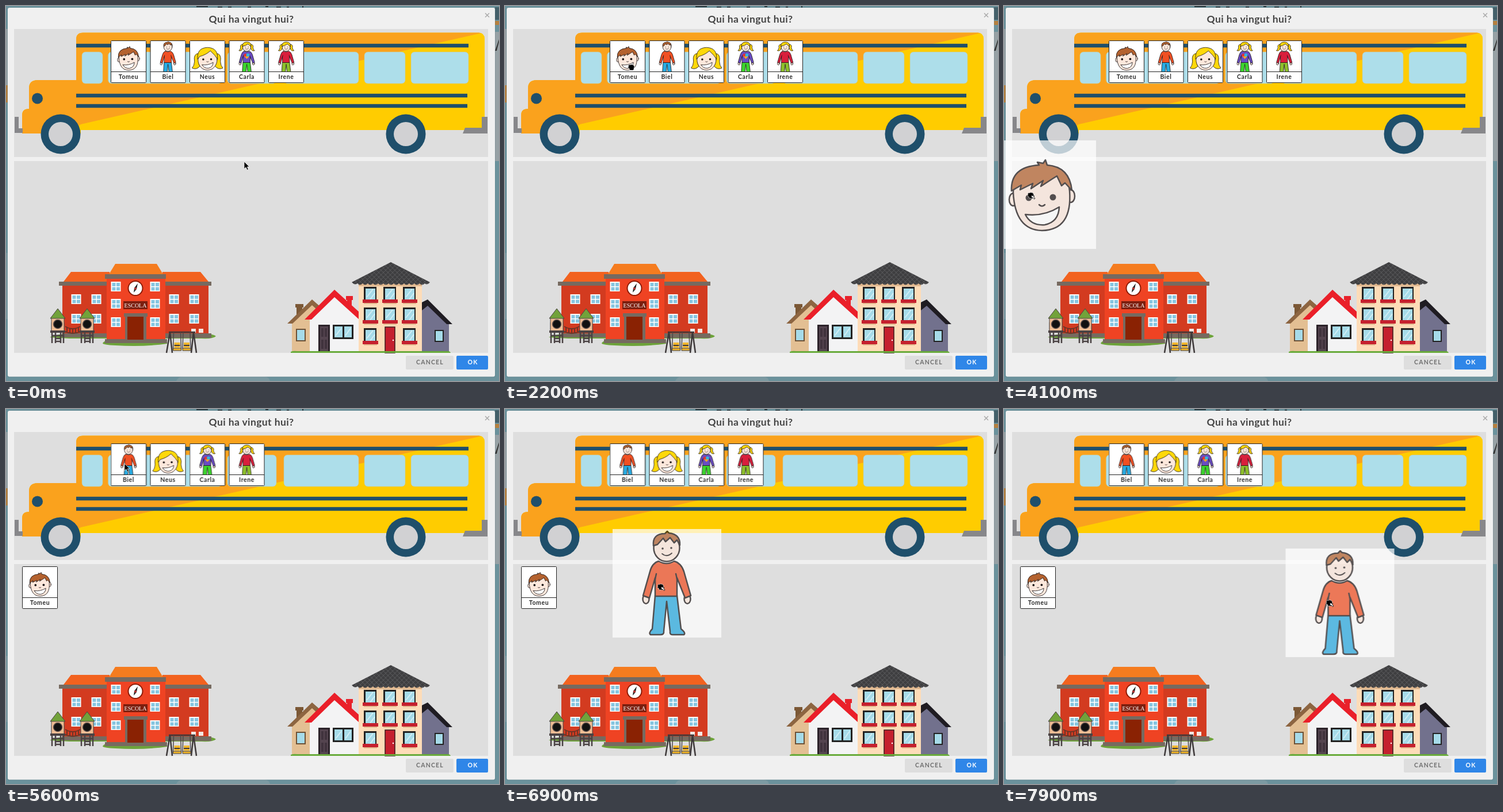
An HTML page that plays this animation: 857x653 px, repeating every 8 s.

```html
<!DOCTYPE html>
<html lang="ca">
<head>
<meta charset="utf-8">
<title>Qui ha vingut hui?</title>
<style>
html, body { margin: 0; width: 100%; height: 100%; overflow: hidden; background: #6b929c; }
svg { display: block; }
text { font-family: Lato, "Open Sans", sans-serif; text-anchor: middle; }
.ink { stroke: #1c1617; stroke-width: 2.5; stroke-linejoin: round; stroke-linecap: round; }
.line { fill: none; }
.skin { fill: #fde8dc; }
.name { font-size: 10.5px; font-weight: 700; letter-spacing: .6px; fill: #2a2a2a; }
.btn { font-size: 10.5px; font-weight: 700; letter-spacing: 1.2px; }

.card, .ghost, .cursor, .arrow, .hand, .badge { animation: 8s step-end infinite; }
.card { animation-name: deal; }
.ghost { transform-origin: 94.5px 94.5px; opacity: 0; }
.first { animation-name: drag-first; }
.second { animation-name: drag-second; }
.cursor { animation-name: move; }
.arrow { animation-name: arrow; }
.hand { animation-name: hand; }
.badge { animation-name: badge; }

@keyframes deal {
  0% { transform: translate(var(--from)); }
  56.25%, 100% { transform: translate(var(--to)); }
}
@keyframes drag-first {
  0% { opacity: 0; transform: translate(148px, 30px) scale(.95); }
  28.75% { opacity: .1; transform: translate(148px, 30px) scale(.95); }
  30% { opacity: .23; transform: translate(152.5px, 60.5px) scale(.96); }
  51.25% { opacity: .72; transform: translate(-29px, 234px); }
  56.25%, 100% { opacity: 0; transform: translate(-29px, 234px); }
}
@keyframes drag-second {
  0% { opacity: 0; }
  73.75% { opacity: .25; transform: translate(148px, 56px) scale(.968); }
  77.5% { opacity: .72; transform: translate(148px, 96px); }
  81.25% { opacity: .72; transform: translate(148px, 136px); }
  86.25% { opacity: .72; transform: translate(187px, 209px); }
  92.5% { opacity: .72; transform: translate(419px, 242px); }
  96.25% { opacity: .72; transform: translate(488px, 243px); }
  98.75%, 100% { opacity: .72; transform: translate(489.5px, 243px); }
}
@keyframes move {
  0% { transform: translate(414px, 271px); }
  5% { transform: translate(414px, 271px); animation-timing-function: steps(4, start); }
  10% { transform: translate(292px, 183px); animation-timing-function: steps(5, start); }
  16.25% { transform: translate(213px, 131px); animation-timing-function: steps(5, start); }
  22.5% { transform: translate(212px, 97px); }
  27.5% { transform: translate(214px, 101px); }
  28.75% { transform: translate(218px, 126px); }
  30% { transform: translate(223px, 157px); }
  51.25% { transform: translate(41px, 324px); }
  56.25% { transform: translate(54px, 328px); }
  61.25% { transform: translate(255px, 205px); }
  63.75% { transform: translate(240px, 133px); }
  67.5% { transform: translate(208px, 97px); }
  70% { transform: translate(206px, 95px); }
  73.75% { transform: translate(223px, 152px); }
  77.5% { transform: translate(223px, 190px); }
  81.25% { transform: translate(223px, 230px); }
  86.25% { transform: translate(265px, 304px); }
  92.5% { transform: translate(491px, 331px); }
  96.25%, 100% { transform: translate(560px, 332px); }
}
@keyframes arrow {
  0%, 56.25% { opacity: 1; }
  27.5%, 73.75%, 100% { opacity: 0; }
}
@keyframes hand {
  0%, 56.25% { opacity: 0; }
  27.5%, 73.75%, 100% { opacity: 1; }
}
@keyframes badge {
  0%, 56.25% { opacity: 0; }
  28.75%, 73.75%, 100% { opacity: 1; }
}
</style>
</head>
<body>
<svg width="857" height="653" viewBox="0 0 857 653">
<defs>
  <!-- figures, each in a 189 x 189 box -->
  <g id="grin">
    <circle cx="72" cy="100" r="5.5" fill="#1c1617"/><circle cx="114" cy="99" r="5.5" fill="#1c1617"/>
    <path class="ink line" d="M90 112Q95 117 100 112"/>
    <path class="ink" fill="#fff" d="M66 129Q98 133 125 116Q124 142 100 147Q76 149 66 129Z"/>
  </g>
  <g id="boy-face">
    <ellipse class="ink skin" cx="45" cy="103" rx="7" ry="11"/><ellipse class="ink skin" cx="145" cy="97" rx="7" ry="11"/>
    <path class="ink skin" d="M45 90Q48 44 95 44Q140 44 143 88Q148 156 95 157Q48 156 45 90Z"/>
    <path class="ink" fill="#b4622f" d="M42 88Q40 46 90 43L87 38L97 40L101 34L104 43Q143 46 147 87L135 74L129 79L121 62L113 67L93 80L97 70L76 84L79 75L57 86L59 78Z"/>
    <use href="#grin"/>
  </g>
  <g id="girl-face">
    <g class="ink" fill="#ffd80a">
      <path d="M48 68Q18 68 25 112Q24 134 12 146Q36 158 54 136Q42 114 50 92Z"/>
      <path d="M141 68Q171 68 164 112Q165 134 177 146Q153 158 135 136Q147 114 139 92Z"/>
    </g>
    <ellipse class="ink skin" cx="95" cy="102" rx="51" ry="56"/>
    <path class="ink" fill="#ffd80a" d="M42 98Q36 38 95 36Q153 38 148 98Q136 78 110 54Q86 76 54 84Z"/>
    <use href="#grin"/>
  </g>
  <g id="body">
    <ellipse class="ink skin" cx="58" cy="122" rx="5.5" ry="8"/><ellipse class="ink skin" cx="130" cy="122" rx="5.5" ry="8"/>
    <path class="ink" fill="var(--legs)" d="M74 116H112L119 174Q128 181 124 184H104Q99 184 100 178L94 126L89 178Q90 184 83 184H66Q62 181 69 174Z"/>
    <path class="ink" fill="var(--top)" d="M80 56Q94 64 107 56Q119 59 124 74L136 116L126 120L112 85V117H74V85L64 120L53 116L65 74Q69 59 80 56Z"/>
    <path class="ink line" d="M74 87L76 78M112 87L110 78"/>
    <ellipse class="ink skin" cx="94" cy="33" rx="22.5" ry="23.5"/>
    <circle cx="87" cy="34" r="1.8" fill="#1c1617"/><circle cx="102" cy="33" r="1.8" fill="#1c1617"/>
    <path class="ink line" style="stroke-width:1.8" d="M86 43Q94 50 103 42"/>
  </g>
  <g id="boy">
    <use href="#body"/>
    <path class="ink" fill="#b4622f" d="M71 29Q69 8 91 8L95 4L98 7Q118 9 117 28L112 19L107 24L100 15L92 22L88 16L78 27Z"/>
  </g>
  <g id="girl">
    <use href="#body"/>
    <g class="ink" fill="#ffd80a">
      <path d="M72 19Q56 20 61 38Q58 50 52 53Q66 58 72 42Z"/><path d="M116 19Q132 20 127 38Q130 50 136 53Q122 58 116 42Z"/>
      <path d="M71 30Q69 7 94 7Q119 7 117 30Q106 25 101 17Q88 27 71 30Z"/>
    </g>
  </g>
  <g id="frame">
    <rect width="61" height="73" rx="1" fill="none" stroke="#222"/>
    <path d="M0 54H61" stroke="#222"/>
  </g>

  <g id="win">
    <rect width="17" height="17" fill="#fff"/>
    <path d="M2 2h6v6H2zM9.5 2h6v6h-6zM2 9.5h6v6H2zM9.5 9.5h6v6h-6z" fill="#86c5e0"/>
  </g>
  <g id="pane">
    <rect width="22" height="24" fill="#222"/><rect x="3" y="3" width="17" height="20" fill="#a6dbe9"/>
    <path d="M5 18L16 4M11 22L19 11" stroke="#d2edf4" stroke-width="2"/>
  </g>
  <g id="flat">
    <use href="#pane"/><rect x="-2" y="22" width="27" height="6" fill="#c5202e"/><path d="M0 29H23" stroke="#e3b98e" stroke-width="2"/>
  </g>
  <g id="row"><use href="#flat" x="622"/><use href="#flat" x="656"/><use href="#flat" x="690"/></g>
  <g id="tower">
    <path d="M-10 24V60M10 24V60M-4 42V60M5 42V60M-10 47H10M-4 52H5M-4 57H5" stroke="#4a4243" stroke-width="2.5"/>
    <rect x="-11" y="15" width="22" height="24" fill="#efbd94" stroke="#4a4243"/>
    <circle cy="27" r="7.5" fill="#111" stroke="#5b4d4b" stroke-width="1.5"/>
    <rect x="-13" y="38" width="26" height="4" fill="#4a4243"/>
    <path d="M0 0L13 17H-13Z" fill="#72a23a" stroke="#4a4243"/>
  </g>
  <g id="swing">
    <path d="M-6 0L-7 29M6 0L7 29" stroke="#4e4849" stroke-width="1.5"/>
    <path d="M-5 18H5V27H-5Z" fill="#f2b62b"/><path d="M-7 28H7V32H-7Z" fill="#f2b62b" stroke="#3d3839"/>
    <path d="M-5 23H5" stroke="#3d3839" stroke-width="2"/>
  </g>
  <g id="wheel"><circle r="34.5" fill="#1f4f6b"/><circle r="21" fill="#d1d1d3"/></g>
  <pattern id="tiles" width="8" height="8" patternUnits="userSpaceOnUse">
    <rect width="8" height="8" fill="#3e3e40"/><path d="M0 0Q4 7 8 0M-4 4Q0 11 4 4M4 4Q8 11 12 4" fill="none" stroke="#58585a"/>
  </pattern>
  <clipPath id="hull">
    <path d="M28 222V190Q28 179 40 179V143Q40 129 55 129H122V58Q122 46.500 134 46.500H822Q832 47 832 57V216H130V222Z"/>
  </clipPath>
</defs>

<!-- dimmed page -->
<rect width="857" height="653" fill="#6b929c"/>
<path d="M0 40H3V140H0ZM850 45H857V270H850Z" fill="#97a1a5"/>
<path d="M0 138H3V168H0ZM850 26H857V33H850Z" fill="#b5803f"/>
<path d="M850 2H857V24H850Z" fill="#44606a"/>
<path d="M850 78L857 58V62L853 78Z" fill="#333"/>
<path d="M0 430H3V545H0ZM296 653Q300 645 308 645H450Q458 647 459 653Z" fill="#7c9aa2"/>
<path d="M331 1H351M368 2H376M386 2H392M420 2H426M451 1H456M470 2H478M488 2H492M516 0V3" stroke="#2d3c41" stroke-width="2"/>

<!-- dialog -->
<rect x="2" y="2" width="849" height="645" rx="4" fill="#4f727b" opacity=".25"/>
<rect x="3" y="3" width="847" height="642.5" rx="3" fill="#f0f0f0"/>
<text x="426.5" y="29" font-size="17.5" font-weight="700" letter-spacing=".4" fill="#444">Qui ha vingut hui?</text>
<path d="M833 12.5L840 19.5M840 12.5L833 19.5" stroke="#a9a9a9" stroke-width="1.5"/>
<path d="M14 40H838V263H14ZM14 270H838V604H14Z" fill="#dedede"/>
<rect x="695" y="609" width="83" height="24" rx="2" fill="#dedede"/><text class="btn" x="737" y="624" fill="#6f6f6f">CANCEL</text>
<rect x="783" y="609" width="55" height="24" rx="2" fill="#2f86e8"/><text class="btn" x="811.5" y="624" fill="#fff">OK</text>

<!-- bus -->
<g clip-path="url(#hull)">
  <rect x="20" y="40" width="820" height="190" fill="#fc0"/>
  <path d="M20 40H840V44L130 206L95 230H20Z" fill="#faa21d"/>
</g>
<path d="M15 193H22V213H29V221H15ZM827 193H837V222H794L798 212H827Z" fill="#87878a"/>
<path d="M122 69H804M122 156H802M122 174H802" stroke="#1f4f6b" stroke-width="6.5"/>
<circle cx="54.5" cy="161" r="9.5" fill="#1f4f6b"/>
<g fill="#addeea" stroke="#cfc98c" stroke-width=".6">
  <rect x="132" y="80" width="36" height="55" rx="6"/>
  <rect x="177.5" y="80" width="198" height="55" rx="6"/>
  <rect x="385" y="80" width="85" height="55" rx="6"/>
  <rect x="483" y="80" width="130" height="55" rx="6"/>
  <rect x="623" y="80" width="71" height="55" rx="6"/>
  <rect x="704" y="80" width="100" height="55" rx="6"/>
</g>
<use href="#wheel" x="95" y="223"/><use href="#wheel" x="695" y="223"/>

<!-- school -->
<path d="M76 577Q90 570 110 573H340Q358 569 365 575Q360 580 340 579H110ZM168 587Q172 580 190 581H270Q282 583 280 588Q240 594 190 591Q168 590 168 587Z" fill="#6da33a"/>
<path d="M98 486H175V573H98ZM277 486H352V573H277Z" fill="#d33b20"/>
<path d="M113 463H180V480H100ZM272 463H338L352 480H272Z" fill="#f2621f"/>
<path d="M92 480H176V487H92ZM276 480H357V487H276ZM277 570H357V578H277ZM97 570H175V577H97Z" fill="#766a60"/>
<path d="M175 474H277V582H175Z" fill="#ef4323"/>
<path d="M190 449H262L273 467H179Z" fill="#f57c1f"/>
<path d="M172 467H278V475H172ZM172 580H280V587H172ZM205 535H246V541H205ZM207 541H244V581H207Z" fill="#766a60"/>
<path d="M211 541H239V581H211Z" fill="#8a2203"/>
<circle cx="225" cy="491.5" r="12.5" fill="#fff" stroke="#8d1c08" stroke-width="2"/>
<path d="M229 483L227 493L222 499L223 491Z" fill="#222"/><circle cx="225" cy="492" r="2" fill="#b33"/>
<rect x="204" y="514" width="42" height="14" fill="#7c1f0f"/>
<text x="225" y="524.5" fill="#fff" style="font:10px 'Liberation Serif',serif">ESCOLA</text>
<g id="wings">
  <use href="#win" x="113.5" y="502"/><use href="#win" x="148.5" y="502"/><use href="#win" x="113.5" y="536"/><use href="#win" x="148.5" y="536"/>
</g>
<use href="#wings" x="170"/>
<g id="tall"><use href="#win" x="182.5" y="480"/><use href="#win" x="182.5" y="510"/><use href="#win" x="182.5" y="542"/></g>
<use href="#tall" x="68"/>
<path d="M322 562H330V569H322ZM335 562H343V569H335Z" fill="#f4e9e4"/>
<path d="M103 558Q116 566 129 558M103 567Q116 573 129 567M106 560V569M111 562V570M116 563V571M121 562V570M126 560V569" fill="none" stroke="#6e3426" stroke-width="2"/>
<use href="#tower" x="90" y="527"/><use href="#tower" x="141" y="527"/>
<path d="M283 568H329M285 568L279 604M285 568L289 604M326 568L322 604M326 568L331 604" stroke="#3d3839" stroke-width="2.5"/>
<use href="#swing" x="297.5" y="568"/><use href="#swing" x="314" y="568"/>

<!-- houses -->
<path d="M505 522H515V541H505ZM503 519H517V525H503Z" fill="#7b5836"/>
<path d="M497 603V548L533 515L552 532V603Z" fill="#e3bf93"/>
<path d="M489 553L532 511L548 525L543 531L532 521L498 553Z" fill="#8d6541"/>
<rect x="505" y="563" width="15" height="20" fill="#a6dbe9" stroke="#6d5136" stroke-width="2"/>
<path d="M723 603V520L733 514L770 552V603Z" fill="#72718d"/>
<path d="M723 516L733 511L776 554H766L733 522L723 530Z" fill="#1f1c22"/>
<rect x="746" y="565" width="14" height="19" fill="#a6dbe9" stroke="#222" stroke-width="2"/>
<path d="M591 505H603V512H601V532H593V512H591Z" fill="#e8222b"/>
<path d="M528 603V540L571 500L614 541V603Z" fill="#f3f3f4"/>
<path d="M519 546L571 494L614 533V546L571 507L531 546Z" fill="#ea1f29"/>
<rect x="543" y="555" width="20" height="48" fill="#2b2229"/><rect x="546" y="558" width="14" height="45" fill="#54444f"/>
<path d="M548 561h4v15h-4zM554 561h4v15h-4zM548 581h4v16h-4zM554 581h4v16h-4z" fill="#40333d"/>
<rect x="568" y="555" width="36" height="25" fill="#222"/>
<path d="M571 558H585V577H571ZM588 558H601V577H588Z" fill="#a6dbe9"/>
<path d="M573 574L583 561M590 574L599 561" stroke="#d2edf4" stroke-width="2"/>
<rect x="613" y="480" width="110" height="123" fill="#fddcb8"/><rect x="613" y="483" width="110" height="5" fill="#dfb78e"/>
<path d="M601 481L669 446L737 481Q732 487 728 483Q723 488 719 483Q714 488 710 483Q705 488 701 483Q696 488 692 483Q687 488 683 483Q678 488 674 483Q669 488 665 483Q660 488 656 483Q651 488 647 483Q642 488 638 483Q633 488 629 483Q624 488 620 483Q615 488 611 483Q606 487 601 481Z" fill="url(#tiles)"/>
<use href="#row" y="489"/><use href="#row" y="525"/>
<use href="#flat" x="622" y="561"/><use href="#flat" x="690" y="561"/>
<rect x="659" y="559" width="17" height="45" fill="#c5202e" stroke="#3a1a1c" stroke-width="1.5"/><circle cx="673" cy="582" r="1.2" fill="#fff"/>
<path d="M495 604V602Q500 600 506 601H768Q772 601 773 604Z" fill="#69ab3b"/>

<!-- cards -->
<g class="card" style="--from:182.5px,60.5px;--to:28.5px,274.5px">
  <rect width="61" height="73" fill="#fff"/><use href="#boy-face" transform="translate(-1.5 -1.5) scale(.337)"/>
  <use href="#frame"/><text class="name" x="30.5" y="66.5">Tomeu</text>
</g>
<g class="card" style="--from:251px,60.5px;--to:182.5px,60.5px;--top:#f15023;--legs:#29abe2">
  <rect width="61" height="73" fill="#fff"/><use href="#boy" transform="scale(.325)"/>
  <path d="M1 54H60V72H1Z" fill="#fff"/><use href="#frame"/><text class="name" x="30.5" y="66.5">Biel</text>
</g>
<g class="card" style="--from:319.5px,60.5px;--to:251px,60.5px">
  <rect width="61" height="73" fill="#fff"/><use href="#girl-face" transform="scale(.325)"/>
  <use href="#frame"/><text class="name" x="30.5" y="66.5">Neus</text>
</g>
<g class="card" style="--from:388px,60.5px;--to:319.5px,60.5px;--top:#6a4cc4;--legs:#3cd42e">
  <rect width="61" height="73" fill="#fff"/>
  <g transform="scale(.325)"><use href="#girl"/>
    <circle cx="87" cy="78" r="9" fill="#e8322e"/><circle cx="100" cy="77" r="9" fill="#31b6e0"/><path d="M82 84H107L94 98Z" fill="#f5a52a"/>
  </g>
  <path d="M1 54H60V72H1Z" fill="#fff"/><use href="#frame"/><text class="name" x="30.5" y="66.5">Carla</text>
</g>
<g class="card" style="--from:456.5px,60.5px;--to:388px,60.5px;--top:#d91f3c;--legs:#8dbf2c">
  <rect width="61" height="73" fill="#fff"/><use href="#girl" transform="scale(.325)"/>
  <path d="M1 54H60V72H1Z" fill="#fff"/><use href="#frame"/><text class="name" x="30.5" y="66.5">Irene</text>
</g>

<!-- dragged pictures -->
<g class="ghost first"><rect width="189" height="189" fill="#fff"/><use href="#boy-face"/></g>
<g class="ghost second" style="--top:#f15023;--legs:#29abe2"><rect width="189" height="189" fill="#fff"/><use href="#boy"/></g>

<!-- pointer -->
<g class="cursor">
  <path class="arrow" d="M0 0V12.5L3 9.8L5.2 14.5L7.3 13.5L5.2 9H9Z" fill="#000" stroke="#fff" stroke-width=".7"/>
  <g class="hand">
    <path d="M1 5Q-1 3 1 2.500Q2 0 4 1.500Q5.500 -.5 7 1.200Q9 0 9.500 2.500Q11.500 3 10.500 6L9.500 11H3L2 8Q-2 7 1 5Z" fill="#000" stroke="#fff" stroke-width=".6"/>
    <path class="badge" d="M6 5.5L12 7L10.5 8.3L13 11L11.5 12.3L9 9.6L7.5 11Z" fill="#fff" stroke="#000" stroke-width=".9"/>
  </g>
</g>
</svg>
</body>
</html>
```
